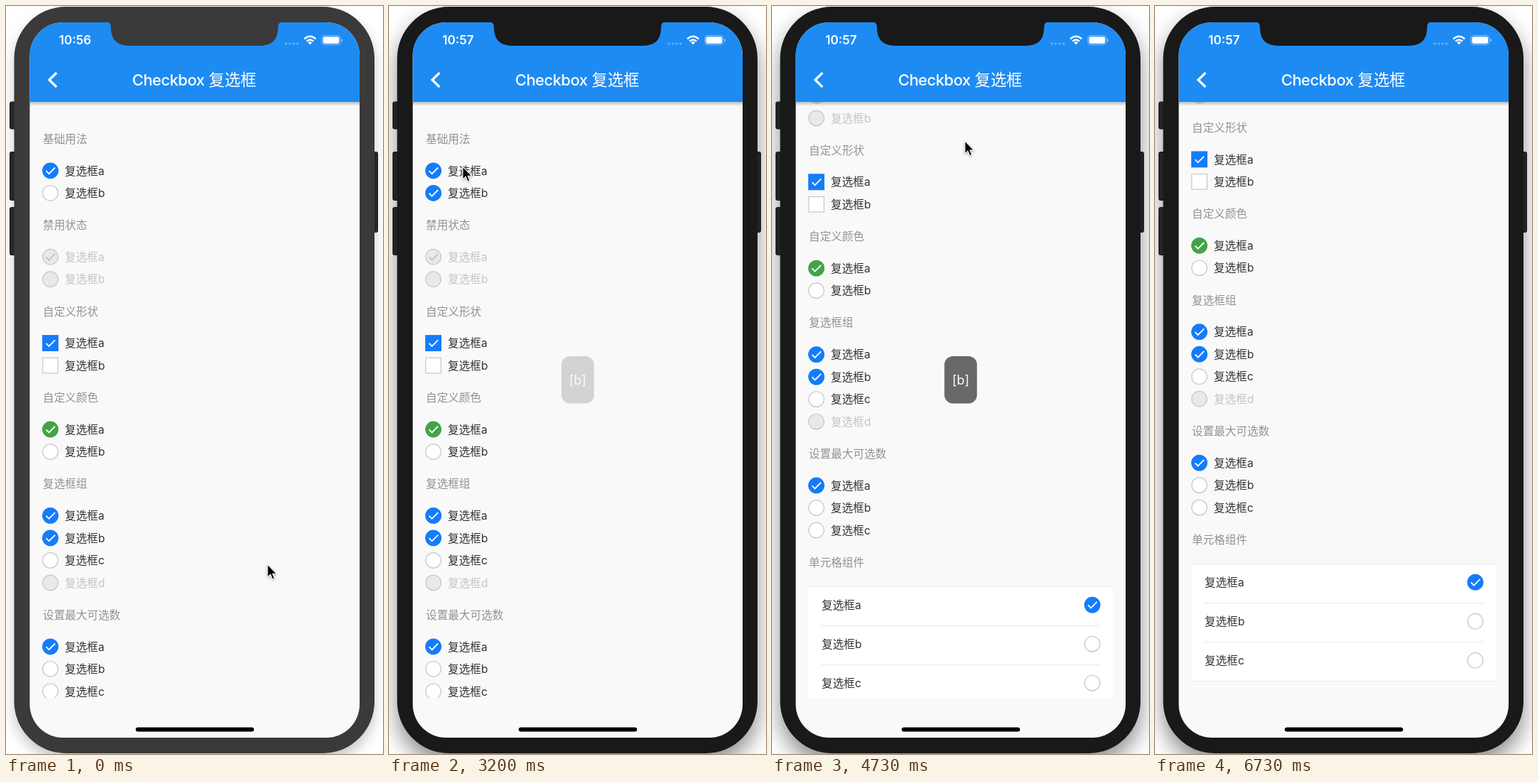
These frames come from a looping animation (532x1053 px, 6.76 s). An HTML page:

```html
<!DOCTYPE html>
<html lang="zh-CN">
<head>
<meta charset="utf-8">
<title>Checkbox</title>
<style>
html, body { margin: 0; width: 100%; height: 100%; overflow: hidden; background: #fff; }
svg { display: block; width: 532px; height: 1053px; --body: #3a3a3a; font: 15.65px Inter, "Noto Sans CJK SC", "Noto Sans CJK", sans-serif; }
svg.active { --body: #191919; }
.body { fill: var(--body); }
#case { filter: drop-shadow(0 10px 9px rgba(0,0,0,.22)); }
.active #case { filter: drop-shadow(0 15px 15px rgba(0,0,0,.45)); }
.side rect { fill: #2c2c2c; stroke: #1b1b1b; }
.head { fill: #929292; }
.label { fill: #323233; }
.label.off { fill: #c4c4c6; }
.box { fill: #fff; stroke: #c6c7ca; stroke-width: 1.2; }
.box.off { fill: #e9e9ed; }
.line { stroke: #e8e8e8; }
.tick { fill: none; stroke: #fff; stroke-width: 1.8; }
.tick.off { stroke: #c0c1c5; }
</style>
</head>
<body>
<svg id="stage" viewBox="0 0 532 1053">
  <defs>
    <clipPath id="screen"><rect x="33.5" y="23" width="465.5" height="1007" rx="47"/></clipPath>
    <clipPath id="view"><rect x="33" y="135" width="467" height="839"/></clipPath>
    <linearGradient id="fade" x2="0" y2="1">
      <stop stop-opacity=".24"/><stop offset="1" stop-opacity="0"/>
    </linearGradient>
  </defs>
  <g class="side">
    <rect x="5.5" y="135" width="9" height="38" rx="2"/>
    <rect x="5.5" y="205.5" width="9" height="68" rx="2"/>
    <rect x="5.5" y="283.5" width="9" height="67" rx="2"/>
    <rect x="515" y="205.5" width="9.5" height="113" rx="2"/>
  </g>
  <rect id="case" class="body" x="11.5" y="1" width="508.5" height="1051" rx="73"/>
  <g clip-path="url(#screen)">
    <rect x="33" y="23" width="467" height="1008" fill="#f9f9f9"/>
    <g clip-path="url(#view)"><g id="list"></g></g>
    <rect x="33" y="135" width="467" height="6" fill="url(#fade)"/>
    <rect x="33" y="23" width="467" height="112" fill="#1e8bf3"/>
    <path class="body" d="M140 22q8 0 8 8q0 26 26 26H358q26 0 26-26q0-8 8-8z"/>
  </g>
  <g fill="#fff">
    <text id="clock" x="97.5" y="54.2" font-size="17.2" font-weight="600" text-anchor="middle"></text>
    <g opacity=".3"><circle cx="395" cy="53" r="1.8"/><circle cx="400.5" cy="53" r="1.8"/><circle cx="406" cy="53" r="1.8"/><circle cx="411.5" cy="53" r="1.8"/></g>
    <path d="M429 54.5l-3-3.2q3-2.5 6 0z"/>
    <path d="M420.9 46.4q8.1-7.4 16.2 0M424 49.6q5-4.4 10 0" fill="none" stroke="#fff" stroke-width="2.4"/>
    <rect x="445.6" y="41.6" width="26.2" height="13" rx="3.8" fill="none" stroke="#fff" stroke-opacity=".45"/>
    <rect x="447.3" y="43.3" width="22.8" height="9.6" rx="2.3"/>
    <path d="M473.2 46v4.4q1.8-.6 1.8-2.2t-1.8-2.2z" opacity=".5"/>
    <path d="M71.3 94L61 104L71.3 114" fill="none" stroke="#fff" stroke-width="3.2"/>
    <text x="178" y="112" font-size="22" font-weight="500" letter-spacing="-.5">Checkbox</text>
    <text x="286" y="112" font-size="22.4" font-weight="500">复选框</text>
  </g>
  <rect x="183" y="1015.5" width="167" height="6" rx="3"/>
  <g id="toast">
    <rect y="493" height="66.5" rx="12" fill="#000" fill-opacity=".88"/>
    <text x="266.3" y="532.5" font-size="18.2" fill="#fff" text-anchor="middle"></text>
  </g>
  <path id="cursor" d="M0 0V18.2L4.2 14.3L7 21L10 19.7L7.2 13.2H12.8Z" stroke="#fff" stroke-width="1.1" style="filter:drop-shadow(0 1px 1.5px rgba(0,0,0,.35))"/>
</svg>
<script>
const $ = id => document.getElementById(id);
const LOOP = 6760, BLUE = '#147cfb', GREEN = '#43a447';

// One letter per box: uppercase = checked
const sections = [
  { title: '基础用法', items: 'Ab' },
  { title: '禁用状态', items: 'Ab', off: 'ab' },
  { title: '自定义形状', items: 'Ab', square: true },
  { title: '自定义颜色', items: 'Ab', color: GREEN },
  { title: '复选框组', items: 'ABcd', off: 'd' },
  { title: '设置最大可选数', items: 'Abc' }
];

const text = (x, y, str, cls) => `<text x="${x}" y="${y + 5.7}" class="${cls}">${str}</text>`;

function box(x, y, on, off, square, color = BLUE) {
  const cls = off ? ' off' : '';
  const shape = (c, style) => square
    ? `<rect x="-10.8" y="-10.8" width="21.6" height="21.6" class="${c}" style="${style}"/>`
    : `<circle r="10.8" class="${c}" style="${style}"/>`;
  const mark = (off ? '' : shape('box', `fill:${color};stroke:${color}`)) +
    `<path class="tick${cls}" d="M-6 .3L-2 4.4L6.6-4.3"/>`;
  return `<g transform="translate(${x} ${y})">${shape('box' + cls, '')}<g class="mark" ${on ? '' : 'visibility="hidden"'}>${mark}</g></g>`;
}

function buildList() {
  let y = 187, out = '';
  for (const { title, items, off = '', square, color } of sections) {
    out += text(52, y, title, 'head');
    y += 44.8;
    for (const ch of items) {
      const name = ch.toLowerCase(), disabled = off.includes(name);
      out += box(62.6, y, ch !== name, disabled, square, color);
      out += text(83, y, '复选框' + name, disabled ? 'label off' : 'label');
      y += 31.5;
    }
    y += 13.6;
  }
  out += text(52, y, '单元格组件', 'head');
  const top = y + 34.3;
  out += `<rect x="51.5" y="${top}" width="430" height="165" fill="#fff"/>`;
  for (let i = 0; i < 4; i++) {
    const ly = top + 55 * i;
    out += i % 3 ? `<path class="line" d="M69.5 ${ly}H463"/>` : `<path class="line" d="M51.5 ${ly}H481.5"/>`;
    if (i < 3) out += text(70, ly + 25.7, '复选框' + 'abc'[i], 'label') + box(452, ly + 25.7, i === 0);
  }
  return out;
}

$('list').innerHTML = buildList();
const [markA, markB] = document.querySelectorAll('.mark');
const [toastBox, toastText] = $('toast').children;

// Smooth monotone interpolation through rows of [time, ...values]
function track(rows, t, k = 1) {
  const last = rows.length - 1;
  if (t <= rows[0][0]) return rows[0][k];
  if (t >= rows[last][0]) return rows[last][k];
  const slope = i => (rows[i + 1][k] - rows[i][k]) / (rows[i + 1][0] - rows[i][0]);
  const tangent = i => {
    if (i === 0 || i === last) return 0;
    const a = slope(i - 1), b = slope(i);
    return a * b > 0 ? 2 * a * b / (a + b) : 0;
  };
  const i = rows.findIndex(r => r[0] > t) - 1;
  const d = rows[i + 1][0] - rows[i][0], u = (t - rows[i][0]) / d, v = 1 - u;
  return rows[i][k] * (1 + 2 * u) * v * v + tangent(i) * d * u * v * v
    + rows[i + 1][k] * u * u * (3 - 2 * u) - tangent(i + 1) * d * u * u * v;
}

const pointer = [
  [150, 369, 786], [950, 92, 266], [1600, 92, 266], [2270, 210, 419], [2400, 211, 421],
  [3100, 104, 226], [3350, 104, 226], [4050, 272, 290], [4200, 271, 288],
  [4430, 266, 199], [4600, 265, 165], [5100, 310, 315], [5650, 316, 322], [6000, 480, 160]
];
const scroll = [[4150, 0], [4430, 89.6], [4650, 200], [4900, 262], [5100, 266.7], [5650, 258.7]];
const toasts = [
  { start: 1500, end: 3130, str: '[a, b]', w: 65 },
  { start: 3175, end: 4830, str: '[b]', w: 46 }
];
const clamp = x => Math.max(0, Math.min(1, x));

function draw() {
  const t = performance.now() % LOOP;
  $('stage').classList.toggle('active', t >= 1450);
  $('clock').textContent = t < 500 ? '10:56' : '10:57';
  markA.setAttribute('visibility', t < 3220 ? 'visible' : 'hidden');
  markB.setAttribute('visibility', t >= 1530 ? 'visible' : 'hidden');
  $('list').setAttribute('transform', `translate(0 ${-track(scroll, t)})`);

  const { start, end, str, w } = toasts[t < 3150 ? 0 : 1];
  $('toast').setAttribute('opacity', clamp(Math.min(t - start, end - t) / 150));
  toastBox.setAttribute('x', 266.3 - w / 2);
  toastBox.setAttribute('width', w);
  toastText.textContent = str;

  $('cursor').setAttribute('transform', `translate(${track(pointer, t, 1)} ${track(pointer, t, 2)})`);
  $('cursor').setAttribute('visibility', t < 6000 ? 'visible' : 'hidden');
  requestAnimationFrame(draw);
}
draw();
</script>
</body>
</html>
```
